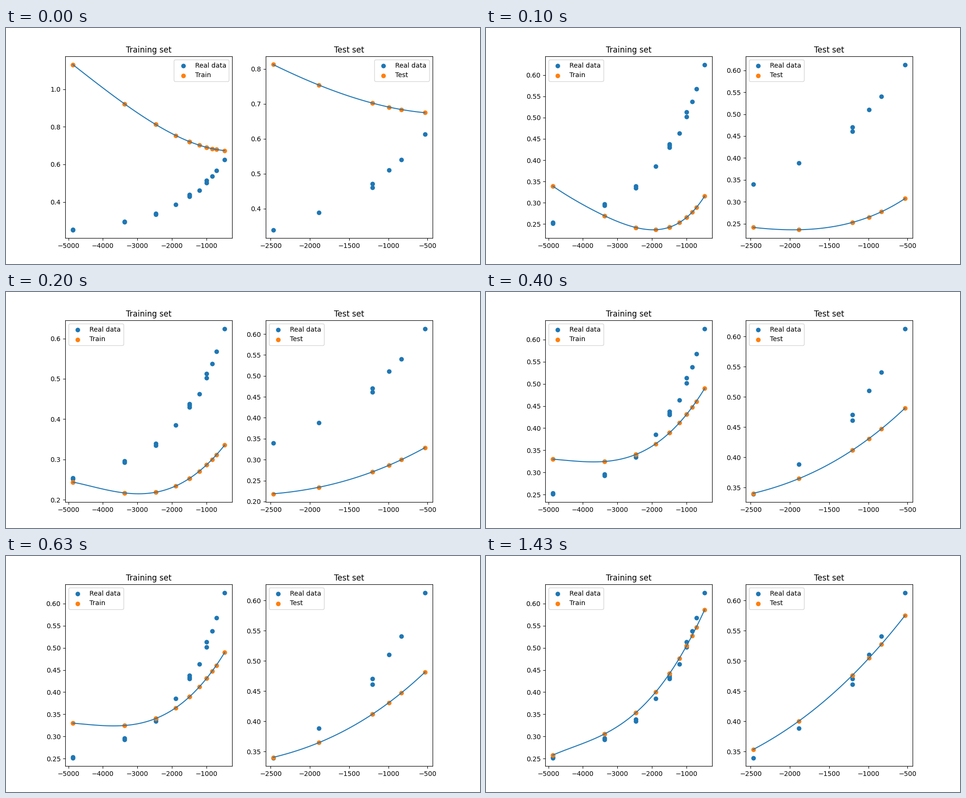
Recreate the animation shown at these times as a matplotlib script. Size 1000 by 500 pixels, loop 1.86 s.

```python
import matplotlib.pyplot as plt
import numpy as np
from matplotlib.animation import FuncAnimation

STEP = 10
LOOP = 1860
STARTS = [0, 100, 200, 300, 400, 790]  # ms at which each fit appears

# Model outputs at a few settings, one row per fit
KEY_SETTINGS = np.array([5, 6, 8, 11, 16])
FITS = [
    (1.1315, .9220, .7540, .6910, .6737),
    (.3390, .2692, .2365, .2654, .3155),
    (.2438, .2168, .2341, .2865, .3355),
    (.3176, .2665, .2563, .2975, .3520),
    (.3300, .3248, .3648, .4310, .4895),
    (.2580, .3058, .4005, .5045, .5860),
]

TRAIN = np.array([5, 5, 6, 6, 7, 7, 8, 9, 9, 9, 10, 11, 11, 12, 13, 16])
TEST = np.array([7, 8, 10, 10, 11, 12, 15])
TEST_BIAS = .003


def position(k):
    """Horizontal place of a setting: an inverse square law."""
    return -1 / (.0029 * k - .00017) ** 2


def measure(settings, bias=0):
    """Readings for each setting; repeats spread out more as it grows."""
    level = np.interp(settings, [5, 7, 9, 10, 11, 13, 15, 16],
                      [.2527, .3367, .434, .463, .5077, .568, .610, .6247])
    for k in np.unique(settings):
        same = settings == k
        if same.sum() > 1:
            level[same] += np.linspace(-1, 1, same.sum()) * .0008 * (k - 4)
    return level + bias


def fit_curve(values):
    coeffs = np.polyfit(position(KEY_SETTINGS) / 1000, values, 4)
    return lambda x: np.polyval(coeffs, x / 1000)


def draw_panel(ax, settings, readings, curve, name, title):
    x = position(settings)
    line_x = np.linspace(x.min(), x.max(), 100)
    ax.scatter(x, readings, label="Real data")
    ax.scatter(x, curve(x), label=name)
    ax.plot(line_x, curve(line_x))
    ax.set_title(title)
    ax.legend()


fig = plt.figure(figsize=(10, 5), dpi=100)
stages = []
for values in FITS:
    curve = fit_curve(values)
    left, right = fig.subplots(1, 2)
    draw_panel(left, TRAIN, measure(TRAIN), curve, "Train", "Training set")
    draw_panel(right, TEST, measure(TEST, TEST_BIAS), curve, "Test", "Test set")
    stages.append((left, right))


def update(n):
    current = np.searchsorted(STARTS, n * STEP, side="right") - 1
    for i, axes in enumerate(stages):
        for ax in axes:
            ax.set_visible(i == current)
    return []


anim = FuncAnimation(fig, update, frames=LOOP // STEP, interval=STEP,
                     repeat=True, repeat_delay=0)
plt.show()
```
